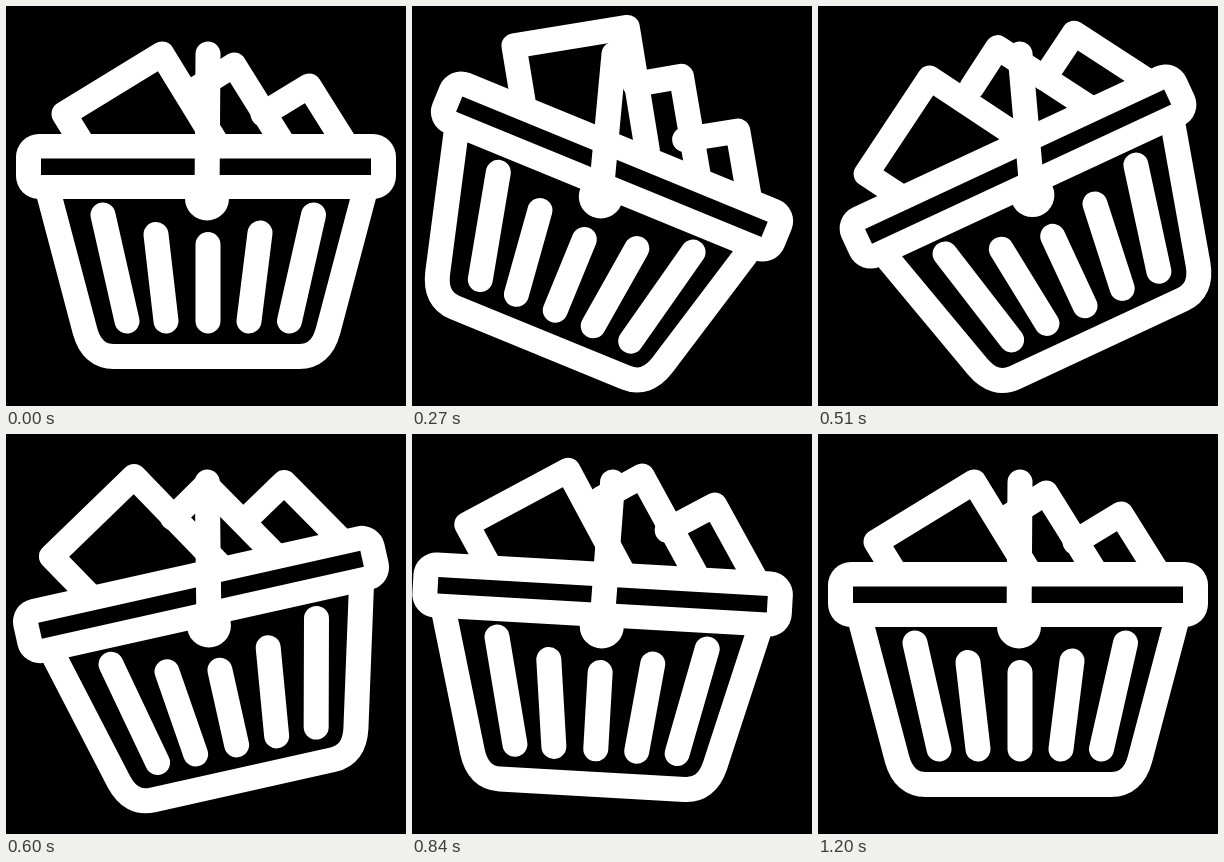
Recreate the animation shown at these times as an HTML page. Size 400 by 400 pixels, loop 3.26 s.

```html
<!DOCTYPE html>
<html lang="en">
<head>
<meta charset="utf-8">
<title>Swinging basket</title>
<style>
  html, body { margin: 0; height: 100%; overflow: hidden; background: #000; }
  svg { display: block; width: 100%; height: 100%; }
  .line { fill: none; stroke: #fff; stroke-width: 25; stroke-linecap: round; stroke-linejoin: round; }
</style>
</head>
<body>
<svg viewBox="0 0 400 400">
  <g id="basket">
    <g class="line">
      <path class="item" d="M87 155L58 108L156 48L221 154"/>
      <path class="item" d="M188 84L228 59L286 152"/>
      <path class="item" d="M257 108L303 80L350 155"/>
    </g>
    <path class="line" d="M42 185L79 325Q86 350.5 108 350.5H293Q315 350.5 322 325L359 185"/>
    <path class="line" d="M97 209L121 315M150 228.5L160 315M202 238.5V315M254 227L243 315M307.5 209L283.5 315"/>
    <rect x="10" y="128" width="380" height="65" rx="23" fill="#fff"/>
    <rect x="35" y="152.5" width="330" height="16.5"/>
  </g>
  <path id="handle" class="line"/>
  <circle id="knob" r="22" fill="#fff"/>
</svg>
<script>
const LOOP = 3260, STEP = 30, PX = 200, PY = 160.5;
// Turning points of the swing: [ms, degrees]
const swings = [[0, 0], [250, 23], [505, -25], [735, 9], [960, -3.8], [1200, 0]];
// Each item hops twice: [start ms, height]
const hops = [[60, 22], [210, 19], [270, 17]];

const basket = document.getElementById('basket');
const items = document.querySelectorAll('.item');
const handle = document.getElementById('handle');
const knob = document.getElementById('knob');

// Half-sine bumps, 0 before the first and after the last
function bump(t, start, length, count = 1) {
  const phase = Math.min(Math.max((t - start) / length, 0), count);
  return Math.abs(Math.sin(Math.PI * phase));
}

function tilt(t) {
  const i = swings.findIndex(([ms]) => ms > t);
  if (i < 0) return 0;
  const [t0, a0] = swings[i - 1], [t1, a1] = swings[i];
  const ease = (1 - Math.cos(Math.PI * (t - t0) / (t1 - t0))) / 2;
  return a0 + (a1 - a0) * ease;
}

function draw(now) {
  const t = Math.floor((now % LOOP) / STEP) * STEP;
  const angle = tilt(t), sway = -10 * bump(t, 510, 540);
  basket.setAttribute('transform', `translate(${sway} 0) rotate(${angle} ${PX} ${PY})`);
  hops.forEach(([start, height], i) => {
    const lift = height * bump(t, start, 420, 2);
    items[i].setAttribute('transform', `translate(${lift / 4} ${-lift})`);
  });

  // The handle hangs from a nearly still top down to the turning knob
  const a = angle * Math.PI / 180, s = Math.sin(a), c = Math.cos(a);
  const x = PX + sway + c - 32 * s, y = PY + s + 32 * c;
  handle.setAttribute('d', `M${202 + sway * 0.15} 48L${x} ${y}`);
  knob.setAttribute('cx', x);
  knob.setAttribute('cy', y);
}

const start = performance.now();
function tick() {
  draw(performance.now() - start);
  requestAnimationFrame(tick);
}
tick();
</script>
</body>
</html>
```
